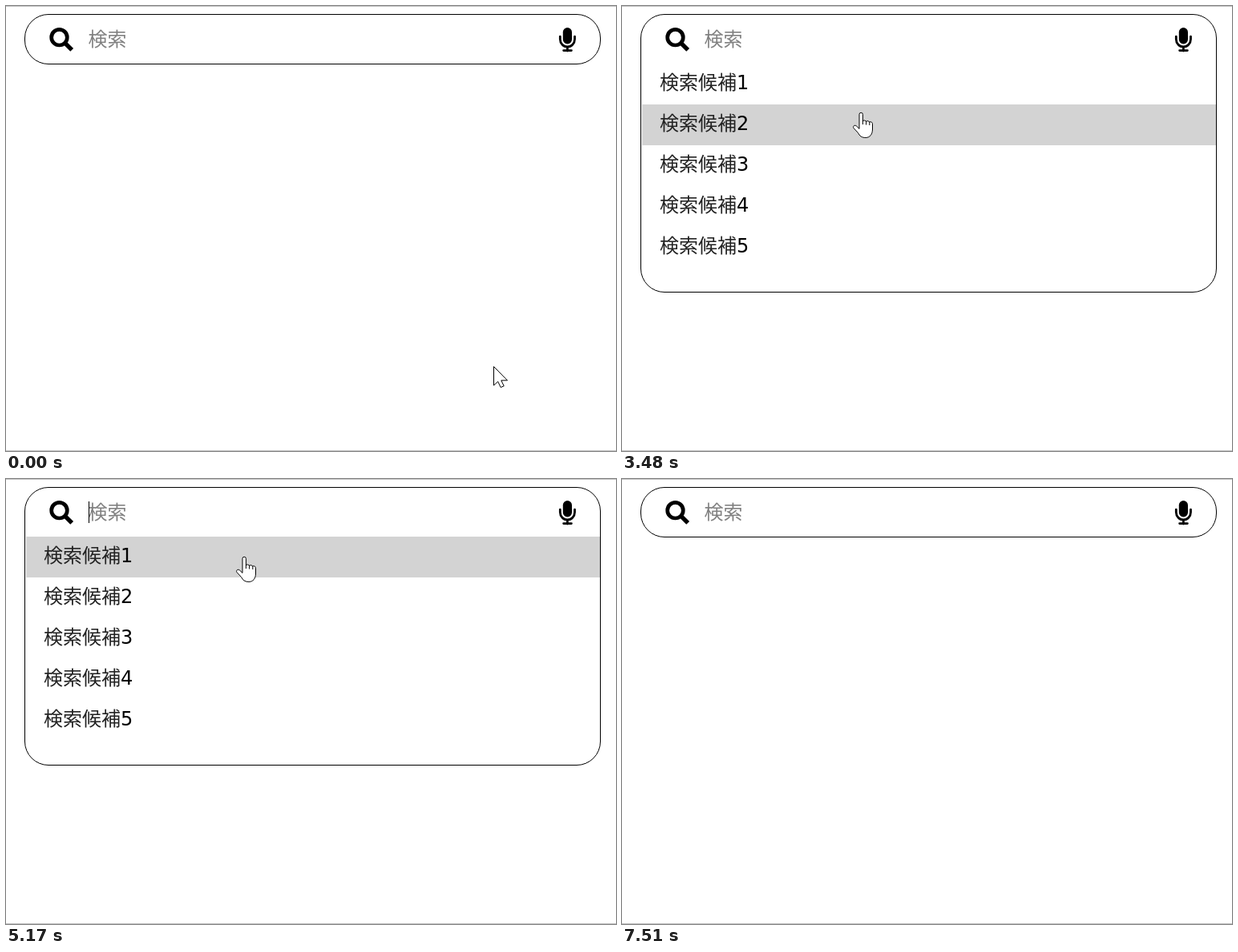
Write an HTML page that moves like this. It is 761x556 px and loops after 8.29 s.

```html
<!DOCTYPE html>
<html lang="ja">
<head>
<meta charset="utf-8">
<style>
  html, body { margin: 0; width: 100%; height: 100%; overflow: hidden; background: #fff; }
  svg { display: block; }
  text { font: 300 24px "Noto Sans CJK JP Light", "Noto Sans CJK JP DemiLight", "Noto Sans CJK JP", sans-serif; fill: #222; }
  .digit { font: 400 24px "DejaVu Sans", sans-serif; }
  .placeholder { fill: #808080; }
  .pointer { fill: #fff; stroke: #000; stroke-linejoin: round; }
</style>
</head>
<body>
<svg width="761" height="556" viewBox="0 0 761 556">
  <path d="M0 .5H761M0 555.5H761" stroke="#c4c4c4"/>
  <rect id="hover" x="25" width="716" height="51" fill="#d3d3d3"/>
  <rect id="frame" x="23.5" y="10.5" width="718" rx="29.5" fill="none" stroke="#000"/>

  <g fill="none" stroke="#000">
    <circle cx="66.5" cy="39.2" r="9.8" stroke-width="4.7"/>
    <path d="M74.4 47.1L82.2 54.9" stroke-width="5.4"/>
    <path d="M691.3 38.2V41.4a9.1 9.6 0 0 0 18.2 0V38.2M700.4 51V56M695.6 55.6H705.4" stroke-width="2.8" stroke-linecap="round"/>
  </g>
  <rect x="694.8" y="27" width="11.2" height="20.4" rx="5.6"/>

  <text class="placeholder" x="102.5" y="50">検索</text>
  <path id="caret" d="M103.5 28V55" stroke="#000"/>
  <g id="items"></g>

  <g id="pointer">
    <circle id="click" r="18" fill="#ffff80"/>
    <path id="arrow" class="pointer" d="M.5 .5V24L5.7 19.2 9.2 26.5 13.2 24.8 9.8 17.8H17.5Z"/>
    <g id="hand" class="pointer">
      <path d="M-2 2.5a2.2 2.2 0 0 1 4.4 0V10.5q2-1.6 4.2 .6 2.4-1.2 4.2 .8 3.7-.8 3.7 3V21c0 6.5-3.5 10.5-8.6 10.5-5 0-7.4-2.2-9.4-6L-9 19.5c-1.4-2.6 1.4-4.4 3.6-2.4L-2 20.4Z"/>
      <path d="M2.4 10V15M6.6 11V15.5M10.8 12V16" fill="none"/>
    </g>
    <path id="beam" transform="translate(3 1)" d="M-7-11.5H7M0-11.5V12M-7 12H7" fill="none" stroke="#333" stroke-width="1.3"/>
  </g>
</svg>
<script>
const LOOP = 8290, OPEN = 1840, CLOSE = 6350, CLICK_TIME = 240, BLINK = 530, STEP = 75;
const ROWS = 5, ROW_TOP = 72, ROW_HEIGHT = 51, ROWS_END = ROW_TOP + ROWS * ROW_HEIGHT;

// brake > 1 slows towards the end, brake < 1 gathers speed.
const GLIDES = [
  { start: 70, steps: 6, x: 331, y: 67 },
  { start: 670, steps: 4, x: 308, y: 47 },
  { start: 2620, steps: 7, x: 297, y: 96 },
  { start: 3400, steps: 11, x: 301, y: 255, brake: 1.3 },
  { start: 4250, steps: 5, x: 311, y: 308 },
  { start: 4790, steps: 6, x: 297, y: 97, brake: .5 },
  { start: 5415, steps: 5, x: 312, y: 384, brake: 3.25 },
  { start: 7270, steps: 4, x: 712, y: 579 }
];

const $ = id => document.getElementById(id);
const show = (id, visible) => $(id).setAttribute('visibility', visible ? 'visible' : 'hidden');

for (let i = 0; i < ROWS; i++) {
  $('items').innerHTML += `<text x="47" y="${104 + i * ROW_HEIGHT}">検索候補<tspan class="digit" fill="#000">${i + 1}</tspan></text>`;
}

// The pointer advances in discrete steps, then rests until the next glide.
function pointerAt(t) {
  let x = 608, y = 450;
  for (const { start, steps, x: toX, y: toY, brake = 1 } of GLIDES) {
    if (t < start) break;
    const progress = Math.min(1, (Math.floor((t - start) / STEP) + 1) / steps);
    const eased = 1 - (1 - progress) ** brake;
    x += (toX - x) * eased;
    y += (toY - y) * eased;
  }
  return [Math.round(x), Math.round(y)];
}

function render(t) {
  const open = t >= OPEN && t < CLOSE;
  const [x, y] = pointerAt(t);
  const overInput = y < ROW_TOP;
  const overRows = open && !overInput && y < ROWS_END;
  // The last row stays lit just after the pointer leaves it.
  const lit = open && !overInput && y < ROWS_END + 6;
  const row = Math.min(ROWS - 1, Math.floor((y - ROW_TOP) / ROW_HEIGHT));

  $('frame').setAttribute('height', open ? 347 : 62);
  show('items', open);
  show('hover', lit);
  if (lit) $('hover').setAttribute('y', ROW_TOP + row * ROW_HEIGHT);
  show('caret', open && Math.floor((t - OPEN) / BLINK) % 2 === 0);

  $('pointer').setAttribute('transform', `translate(${x} ${y})`);
  show('click', [OPEN, CLOSE].some(at => t >= at && t < at + CLICK_TIME));
  show('hand', overRows);
  show('beam', overInput);
  show('arrow', !overRows && !overInput);
}

const begin = performance.now();
function tick() {
  render((performance.now() - begin) % LOOP);
  requestAnimationFrame(tick);
}
tick();
</script>
</body>
</html>
```
